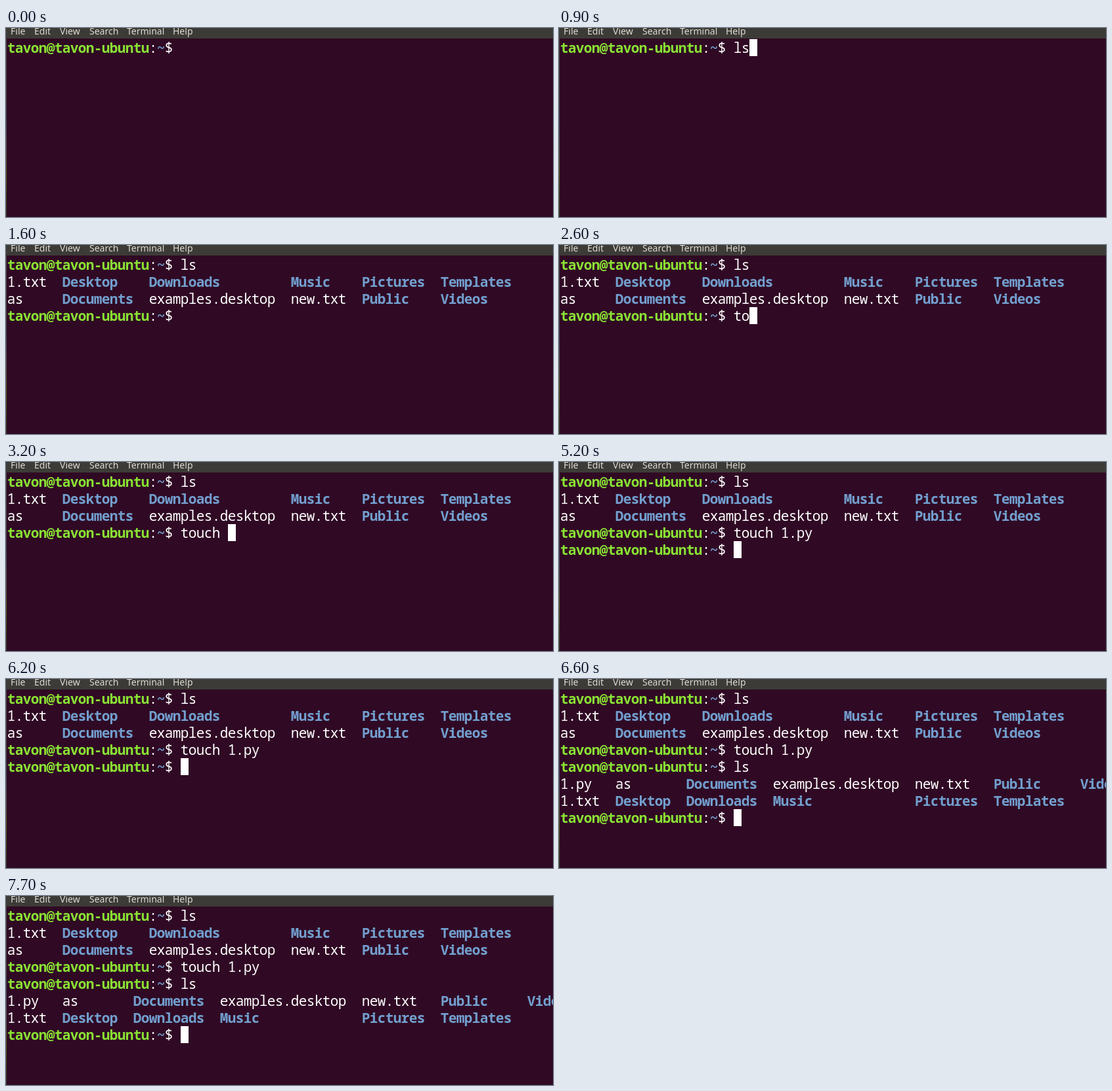
Recreate the animation shown at these times as an HTML page with a canvas. Size 833 px wide and 289 px high, loop 8 s.

```html
<!DOCTYPE html>
<html lang="en">
<head>
<meta charset="utf-8">
<title>Terminal</title>
<style>
  html, body { margin: 0; width: 100%; height: 100%; overflow: hidden; background: #300a24; }
  canvas { display: block; }
</style>
</head>
<body>
<canvas id="stage" width="833" height="289"></canvas>
<script>
const ctx = document.getElementById('stage').getContext('2d');
const LOOP = 8000;
const CELL = 12, LINE = 26, LEFT = 2, TOP = 17, BASE = 21;
const PROMPT_COLS = 22;
const WHITE = '#ffffff', GREEN = '#8ae234', BLUE = '#729fcf';

const menu = [['File', 7], ['Edit', 43], ['View', 82], ['Search', 127], ['Terminal', 184], ['Help', 254]];

// Each listing row holds [column, name]; capitalised names are folders.
const firstListing = [
  [[0, '1.txt'], [7, 'Desktop'], [18, 'Downloads'], [36, 'Music'], [45, 'Pictures'], [55, 'Templates']],
  [[0, 'as'], [7, 'Documents'], [18, 'examples.desktop'], [36, 'new.txt'], [45, 'Public'], [55, 'Videos']]
];
const secondListing = [
  [[0, '1.py'], [7, 'as'], [16, 'Documents'], [27, 'examples.desktop'], [45, 'new.txt'], [55, 'Public'], [66, 'Videos']],
  [[0, '1.txt'], [7, 'Desktop'], [16, 'Downloads'], [27, 'Music'], [45, 'Pictures'], [55, 'Templates']]
];

// keys: [time, characters typed so far]; hidden: cursor blink-off span.
const commands = [
  { row: 0, start: 0, end: 1000, hidden: [0, 500], keys: [[800, 1], [900, 2]], text: 'ls', output: firstListing },
  { row: 3, start: 1000, end: 5200, hidden: [1600, 2100], text: 'touch 1.py', output: [],
    keys: [[2500, 1], [2600, 2], [2700, 3], [2800, 5], [3200, 6], [3500, 7], [3600, 8], [4200, 9], [4600, 10]] },
  { row: 4, start: 5200, end: 6600, hidden: [5700, 6200], keys: [[6300, 1], [6400, 2]], text: 'ls', output: secondListing },
  { row: 7, start: 6600, end: LOOP, hidden: [7100, 7600], keys: [], text: '', output: [] }
];

function write(text, col, row, color = WHITE, bold = false) {
  ctx.font = `${bold ? 'bold ' : ''}21px "Noto Sans Mono", "DejaVu Sans Mono", monospace`;
  ctx.textAlign = 'center';
  ctx.fillStyle = color;
  [...text].forEach((ch, i) =>
    ctx.fillText(ch, LEFT + (col + i + 0.5) * CELL, TOP + row * LINE + BASE));
}

function drawWindow() {
  ctx.fillStyle = '#300a24';
  ctx.fillRect(0, 0, 833, 289);

  const edge = ctx.createLinearGradient(0, 16, 0, 289);
  [[0, '#46443f'], [0.35, '#4a4648'], [0.45, '#3d4a63'], [0.6, '#5b5753'], [0.75, '#5c6427'], [0.9, '#3a4a1c'], [1, '#33401c']]
    .forEach(([at, color]) => edge.addColorStop(at, color));
  ctx.fillStyle = edge;
  ctx.fillRect(0, 16, 1, 273);

  ctx.fillStyle = '#3c3b37';
  ctx.fillRect(0, 0, 833, 16);
  ctx.font = '14px "Noto Sans", "Open Sans", sans-serif';
  ctx.textAlign = 'left';
  ctx.fillStyle = '#dfdbd2';
  menu.forEach(([label, x]) => ctx.fillText(label, x, 10));
}

function drawPrompt(row) {
  write('tavon@tavon-ubuntu', 0, row, GREEN, true);
  write(':', 18, row);
  write('~', 19, row, BLUE, true);
  write('$', 20, row);
}

function drawListing(rows, top) {
  rows.forEach((entries, i) => entries.forEach(([col, name]) => {
    const folder = /^[A-Z]/.test(name);
    write(name, col, top + i, folder ? BLUE : WHITE, folder);
  }));
}

function drawCommand(cmd, t) {
  if (t < cmd.start) return;
  const typed = cmd.keys.reduce((n, [at, count]) => t >= at ? count : n, 0);
  drawPrompt(cmd.row);
  write(cmd.text.slice(0, typed), PROMPT_COLS, cmd.row);

  if (t >= cmd.end) {
    drawListing(cmd.output, cmd.row + 1);
  } else if (t < cmd.hidden[0] || t >= cmd.hidden[1]) {
    ctx.fillStyle = WHITE;
    ctx.fillRect(LEFT + (PROMPT_COLS + typed) * CELL, TOP + cmd.row * LINE, CELL, LINE);
  }
}

let origin = null;
function frame(now) {
  origin ??= now;
  const t = (now - origin) % LOOP;
  drawWindow();
  commands.forEach(cmd => drawCommand(cmd, t));
  requestAnimationFrame(frame);
}
requestAnimationFrame(frame);
</script>
</body>
</html>
```
